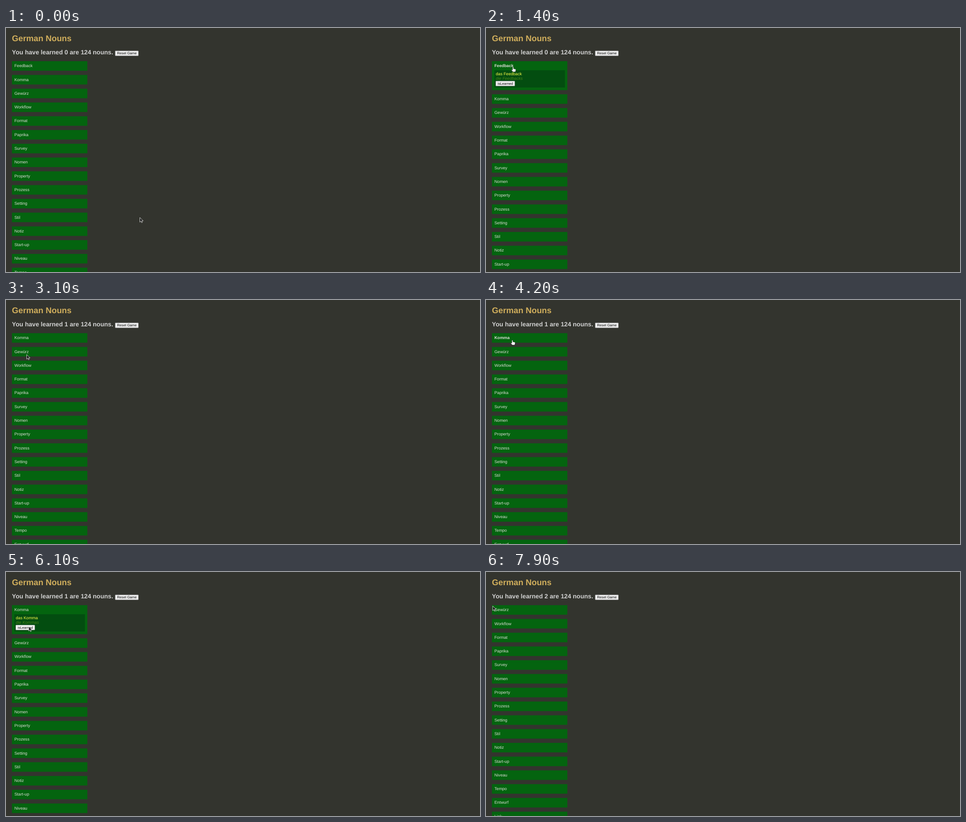
Recreate the animation shown at these times as an HTML page. Size 1043 by 537 pixels, loop 8 s.

```html
<!DOCTYPE html>
<html lang="en">
<head>
<meta charset="utf-8">
<title>German Nouns</title>
<style>
html, body { margin: 0; width: 100%; height: 100%; overflow: hidden; background: #33342e; }
svg { display: block; width: 1043px; height: 537px; }
text { font: 9.15px "Liberation Sans", Arial, sans-serif; fill: #dcdcd6; text-rendering: geometricPrecision; }
.title { font-size: 18.3px; font-weight: bold; fill: #d0ae5c; }
.score { font-size: 13.65px; font-weight: bold; fill: #d0d0d0; }
.bold { font-weight: bold; }
.row { fill: #04640f; }
.panel { fill: #034d10; }
.single { fill: #ffff48; }
.plural { fill: #4a8418; font-style: italic; }
.button { stroke: #777; stroke-width: .6; }
.label { font-size: 7.64px; fill: #000; }
.arrow { fill: #1c1c1c; stroke: #fff; stroke-width: .75; }
.hand { fill: #fff; stroke: #1c1c1c; stroke-width: .5; }
</style>
</head>
<body>
<svg id="stage" viewBox="0 0 1043 537"></svg>
<script>
const stage = document.getElementById("stage");
const LOOP = 8000, STEP = 100;
const TOP = 73, PITCH = 30.3, OPEN_SHIFT = 42.6;
const words = ("Feedback Komma Gewürz Workflow Format Paprika Survey Nomen Property " +
  "Prozess Setting Stil Notiz Start-up Niveau Tempo Entwurf Link").split(" ");

// Clicks alternately open the first word and mark it as learned.
const clicks = [1400, 3100, 4300, 6200];
const home = { x: 294.5, y: 417 };
const glides = [
  { end: 600, time: 600, x: 58.5, y: 92.5 },
  { end: 900, time: 200, x: 59.5, y: 85.5 },
  { end: 1800, time: 100, x: 60.5, y: 89.4 },
  { end: 2000, time: 100, x: 55, y: 94 },
  { end: 2500, time: 200, x: 45.5, y: 120 },
  { end: 3900, time: 200, x: 54, y: 92.5 },
  { end: 4300, time: 300, x: 58.5, y: 87.5 },
  { end: 5100, time: 500, x: 46.6, y: 125 },
  { end: 5700, time: 300, x: 50, y: 119.8 },
  { end: 7000, time: 300, x: 58.5, y: 90.2 },
  { end: 7900, time: 300, x: 14.8, y: 74.8 }
];

const easeOut = p => 1 - (1 - p) ** 2;

function pointerAt(t) {
  let { x, y } = home;
  for (const g of glides) {
    const p = easeOut(Math.min(1, Math.max(0, 1 - (g.end - t) / g.time)));
    x += (g.x - x) * p;
    y += (g.y - y) * p;
  }
  return { x, y };
}

function hoveredRow({ x, y }, open) {
  const offset = y - TOP - 5.5, row = Math.floor(offset / PITCH);
  const inside = x > 18.5 && x < 173.5 && offset >= 0 && offset % PITCH < 11;
  return inside && (!open || row === 0) ? row : -1;
}

const rect = (x, y, w, h, cls, extra = "") =>
  `<rect x="${x}" y="${y}" width="${w}" height="${h}" class="${cls}" ${extra}/>`;
const text = (x, y, str, cls = "") => `<text x="${x}" y="${y}" class="${cls}">${str}</text>`;
const button = (x, y, w, str, fill = "#efefef") =>
  rect(x, y, w, 11, "button", `rx="1" fill="${fill}"`) + text(x + 4.4, y + 8.2, str, "label");

function details(word, { x, y }, pressed) {
  const hover = x > 21 && x < 64 && y > 117 && y < 128;
  const fill = pressed ? "#f5f5f5" : hover ? "#e5e5e5" : "#efefef";
  return rect(18.5, 93, 155.2, 38, "panel") +
    text(21.5, 103.7, "das " + word, "single") +
    text(21.5, 114.2, `die ${word}s`, "plural") +
    button(21.4, 116.7, 42, "isLearned", fill);
}

function cursor({ x, y }, hand) {
  const shape = hand
    ? "M-1 .8Q0-.5 1 .8V4L5.4 5Q6.3 5.4 6.1 6.5L5.2 11H-.2L-3.2 7.4Q-3.4 6.2-2.2 6.3L-1 7.1Z"
    : "M0 0V10.2L2.4 8.1 4 11.5 5.6 10.7 4.1 7.4H7.4Z";
  return `<path class="${hand ? "hand" : "arrow"}" transform="translate(${x} ${y})" d="${shape}"/>`;
}

function draw(t) {
  const done = clicks.filter(c => c <= t).length;
  const learned = done >> 1, open = done % 2 === 1;
  const pressed = open && clicks[done] - t <= STEP;
  const pos = pointerAt(t), hovered = hoveredRow(pos, open);
  const list = words.slice(learned);
  let out = text(13.1, 28.6, "German Nouns", "title") +
    text(13.1, 58.2, `You have learned ${learned} are 124 nouns.`, "score") +
    button(240.2, 50.2, 51.2, "Reset Game");
  list.slice(0, 16).forEach((word, i) => {
    const top = TOP + i * PITCH + (open && i ? OPEN_SHIFT : 0);
    out += rect(13.1, top, 165.9, open && !i ? 63.8 : 21, "row") +
      text(18.5, top + 13.2, word, i === hovered ? "bold" : "");
  });
  if (open) out += details(list[0], pos, pressed);
  stage.innerHTML = out + cursor(pos, hovered >= 0);
}

const start = performance.now();
let shown = -1;
function tick() {
  const t = Math.floor((performance.now() - start) % LOOP / STEP) * STEP;
  if (t !== shown) draw(shown = t);
  requestAnimationFrame(tick);
}
tick();
</script>
</body>
</html>
```
